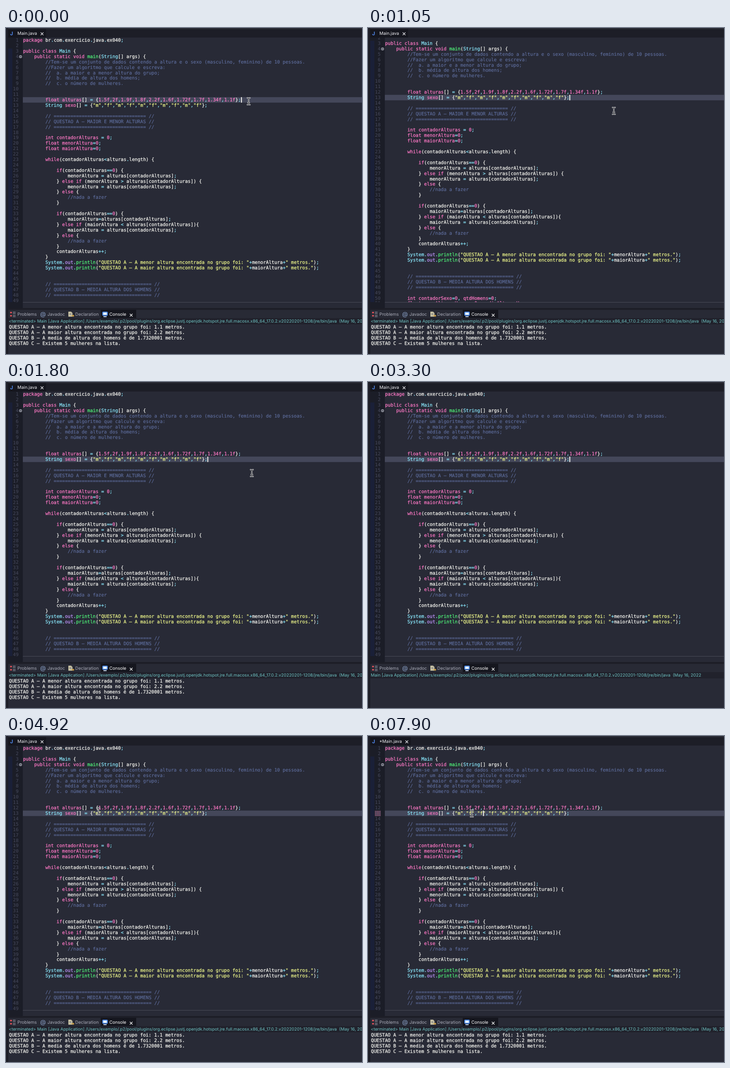
Recreate the animation shown at these times as an HTML page. Size 782 px wide and 716 px high, loop 8 s.

```html
<!DOCTYPE html>
<html lang="pt">
<head>
<meta charset="utf-8">
<title>Main.java</title>
<style>
html, body { margin: 0; width: 100%; height: 100%; overflow: hidden; background: #1d1e27; }
#stage { position: relative; width: 782px; height: 716px; overflow: hidden; background: #1d1e27;
  font: 9.6px/18px Inter, "Open Sans", sans-serif; color: #a9abb8; text-rendering: geometricPrecision; white-space: pre; }
#stage div, #stage svg { position: absolute; }
#stage i { font-style: normal; line-height: 0; }

#topEdge { left: 5px; top: 1px; width: 777px; height: 1px; background: #3b3d49; }
.tab { background: #15161e; color: #f0f0f4; }
#fileTab { left: 5px; top: 2px; height: 19px; line-height: 22px; padding: 0 4px 0 20px; }
#fileTab b { font-weight: 400; margin-left: 6px; font-size: 15px; line-height: 0; vertical-align: -1.5px; }
#stage .j { position: absolute; left: 4px; top: 0; color: #4f86e8; font-weight: 700; font-size: 11px; line-height: 21px; }

.mono { font: 10.2px/11.9px "DejaVu Sans Mono", "Noto Sans Mono", monospace; -webkit-text-stroke: .25px currentColor; }
#editor { left: 0; top: 21px; width: 782px; height: 581px; overflow: hidden; background: #282a36; }
#ruler { left: 0; top: 0; width: 37px; height: 593px; background: linear-gradient(90deg, #1d1e27 5px, #1b1d27 5px); }
#range { left: 5px; top: 23.8px; width: 9px; height: 900px; background: #1a2038; }
#hbar { left: 0; top: 602px; width: 782px; height: 13px; background: linear-gradient(90deg, #1d1e27 5px, #1b1d27 5px 37px, #282a36 37px); }
#hbar::after { content: ""; position: absolute; left: 37px; right: 0; height: 1px; background: #484a57; }
#doc { left: 0; top: .1px; width: 782px; height: 100%; }
#code { left: 37.4px; top: 1px; color: #f8f8f2; }
#nums { left: 0; top: 1px; width: 27.6px; text-align: right; color: #474a5e; -webkit-text-stroke: 0; }
#current { left: 37px; top: 0; width: 745px; height: 11.9px; background: #44475a; }
#mark { left: 15px; top: 142.8px; width: 13px; height: 11.9px; background: #65465f; }
#caret { left: 0; top: 0; width: 1.5px; height: 11.9px; background: #f8f8f2; }

.key { color: #ff79c6; } .type { color: #8be9fd; } .op { color: #8be9fd; } .call { color: #50fa7b; }
.field { color: #bd93f9; } .str { color: #f1fa8c; } .note { color: #6272a4; -webkit-text-stroke: .1px; }

#views { left: 5px; top: 619px; width: 777px; height: 18px; background: #282a35; line-height: 21px; }
#views div { top: 0; height: 18px; }
#info { left: 5px; top: 637px; width: 777px; height: 14px; padding-left: 1px; font-size: 9.35px; line-height: 15px; color: #6fc4c4; background: #21222c; }
#console { left: 5px; top: 651px; width: 777px; height: 65px; background: #282a36; }
#output { left: 1.5px; top: 1px; color: #f8f8f2; }
#mouse { left: -6px; top: -10px; width: 12px; height: 20px; }

.play { animation: 8s step-end infinite; }
#doc { animation-name: scroll; } #current { animation-name: row; } #caret { animation-name: caret; }
#mouse { animation-name: mouse; } #output { animation-name: print; } #mark { animation-name: mark; }
.ended { animation-name: ended; } .star { animation-name: star; }
.before { animation-name: before; } .after { animation-name: after; }

@keyframes scroll {
  0% { transform: none; } 13.125% { transform: translateY(-17px); } 15% { transform: translateY(-150px); }
  16.875% { transform: translateY(-305.7px); } 18.75% { transform: translateY(-270px); }
  20.625% { transform: translateY(-80px); } 22.5%, 100% { transform: none; }
}
@keyframes row {
  0% { transform: translateY(130.9px); } 3.75%, 100% { transform: translateY(142.8px); }
}
@keyframes caret {
  0% { transform: translate(516.2px, 130.9px); opacity: 1; }
  3.75% { transform: translate(442.3px, 142.8px); opacity: 1; }
  33.75% { transform: translate(442.3px, 142.8px); opacity: 0; }
  41.25% { transform: translate(442.3px, 142.8px); opacity: 1; }
  44.875% { transform: translate(442.3px, 142.8px); opacity: 0; }
  52.375% { transform: translate(442.3px, 142.8px); opacity: 1; }
  59.625% { transform: translate(442.3px, 142.8px); opacity: 0; }
  67.125% { transform: translate(442.3px, 142.8px); opacity: 1; }
  74.5% { transform: translate(442.3px, 142.8px); opacity: 0; }
  87.625% { transform: translate(252.6px, 142.8px); opacity: 1; }
  93.25% { transform: translate(246.5px, 142.8px); opacity: 1; }
  95.125%, 100% { transform: translate(252.6px, 142.8px); opacity: 1; }
}
@keyframes mouse {
  0% { transform: translate(533px, 161px); } 3.75% { transform: translate(535px, 166px); }
  5.625% { transform: translate(538px, 169px); } 7.5% { transform: translate(539px, 171px); }
  11.25% { transform: translate(540px, 177px); } 13.125% { transform: translate(540px, 182px); }
  15% { transform: translate(544px, 192px); } 16.875% { transform: translate(546px, 199px); }
  20.625% { transform: translate(543px, 199px); } 22.5% { transform: translate(540px, 200px); }
  24.375% { transform: translate(383px, 145px); } 26.25% { transform: translate(383px, -30px); }
  48.625% { transform: translate(250px, 146px); } 50.5% { transform: translate(130px, 175px); }
  52.375% { transform: translate(75px, 186px); } 54.25% { transform: translate(82px, 190px); }
  56% { transform: translate(112px, 174px); } 57.875% { transform: translate(152px, 167px); }
  59.625% { transform: translate(186px, 165px); } 61.5% { transform: translate(203px, 165px); }
  63.375% { transform: translate(207px, 166px); } 65.25% { transform: translate(212px, 165px); }
  67.125% { transform: translate(220px, 164px); } 69% { transform: translate(228px, 165px); }
  70.875% { transform: translate(236px, 166px); } 72.625% { transform: translate(244px, 167px); }
  74.5% { transform: translate(249px, 168px); } 76.375% { transform: translate(252px, 169px); }
  78.25% { transform: translate(253px, 178px); } 80.125% { transform: translate(256px, 184px); }
  82% { transform: translate(257px, 186px); } 87.625% { transform: translate(255px, 171px); }
  89.5% { transform: translate(285px, 212px); } 91.375% { transform: translate(312px, 240px); }
  93.25% { transform: translate(312px, -30px); } 97% { transform: translate(246px, 186px); }
  98.75%, 100% { transform: translate(228px, 170px); }
}
@keyframes print { 0% { opacity: 1; } 41.25% { opacity: 0; } 43.125%, 100% { opacity: 1; } }
@keyframes ended { 0% { font-size: 9.35px; } 41.25% { font-size: 0; } 44.875%, 100% { font-size: 9.35px; } }
@keyframes mark { 0% { opacity: 0; } 93.25%, 100% { opacity: 1; } }
@keyframes star { 0% { font-size: 0; } 93.25%, 100% { font-size: 9.6px; } }
@keyframes before { 0% { font-size: 10.2px; } 93.25%, 100% { font-size: 0; } }
@keyframes after { 0% { font-size: 0; } 95.125%, 100% { font-size: 10.2px; } }
</style>
</head>
<body>
<div id="stage">
  <div id="topEdge"></div>
  <div id="fileTab" class="tab"><i class="j">J</i><i class="star play">*</i>Main.java<b>×</b></div>

  <div id="editor">
    <div id="ruler"></div>
    <div id="doc" class="mono play">
      <div id="range"></div>
      <div id="current" class="play"></div>
      <div id="mark" class="play"></div>
      <div id="nums"></div>
      <svg style="left:28px;top:38px" width="8" height="8"><circle cx="4" cy="4" r="3.3" fill="#8e909b"/><path d="M2 4h4" stroke="#1b1d27"/></svg>
      <div id="code"></div>
      <div id="caret" class="play"></div>
    </div>
  </div>
  <div id="hbar"></div>

  <div id="views">
    <div style="left:20px">Problems</div>
    <div style="left:86px">Javadoc</div>
    <div style="left:147px">Declaration</div>
    <div class="tab" style="left:203px;width:78px"></div>
    <div style="left:222px;color:#fff">Console</div>
    <div style="left:265px;color:#fff;font-size:15px">×</div>
    <div style="left:70px;color:#8fa6cf;font-size:13px">@</div>
    <svg style="left:0;top:0" width="240" height="18" fill="none">
      <path d="M4 6h4M4 13h4" stroke="#e0545c" stroke-width="3"/>
      <path d="M10 5h6M10 8h6M10 12h6M10 15h6" stroke="#a9abb8"/>
      <path d="M132 4h6l3 3v8h-9z" fill="#c9c3a4"/>
      <path d="M134 8h5M134 10.5h5" stroke="#6b6d7a"/>
      <path d="M138 13h6m-2-2l2 2-2 2" stroke="#d5a545" stroke-width="1.5"/>
      <rect x="207.5" y="5" width="10" height="7" rx="1" fill="#eaf2ff" stroke="#4b8bf0" stroke-width="2"/>
      <path d="M209 15h7" stroke="#c4d4ee" stroke-width="2"/>
    </svg>
  </div>
  <div id="info"><i class="ended play">&lt;terminated&gt; </i>Main [Java Application] /Users/exemplo/.p2/pool/plugins/org.eclipse.justj.openjdk.hotspot.jre.full.macosx.x86_64_17.0.2.v20220201-1208/jre/bin/java  (May 16, 2022</div>
  <div id="console"><div id="output" class="mono play">QUESTAO A – A menor altura encontrada no grupo foi: 1.1 metros.
QUESTAO A – A maior altura encontrada no grupo foi: 2.2 metros.
QUESTAO B – A media de altura dos homens é de 1.7320001 metros.
QUESTAO C – Existem 5 mulheres na lista.</div></div>

  <svg id="mouse" class="play" viewBox="-6 -10 12 20" fill="none" stroke-linecap="round">
    <defs><path id="beam" d="M-3 -7.5Q0 -7.5 0 -5.5Q0 -7.5 3 -7.5M0 -5.5V5.5M-3 7.5Q0 7.5 0 5.5Q0 7.5 3 7.5M-1.5 3H1.5"/></defs>
    <use href="#beam" stroke="#f4f4f4" stroke-width="2.6"/>
    <use href="#beam" stroke="#17181d"/>
  </svg>
</div>

<script>
const heading = text => {
  const rule = `        // ${"=".repeat(text.length)} //`;
  return `${rule}\n        // ${text} //\n${rule}`;
};

const source = `package br.com.exercicio.java.ex040;

public class Main {
    public static void main(String[] args) {
        //Tem-se um conjunto de dados contendo a altura e o sexo (masculino, feminino) de 10 pessoas.
        //Fazer um algoritmo que calcule e escreva:
        //  a. a maior e a menor altura do grupo;
        //  b. média de altura dos homens;
        //  c. o número de mulheres.


        float alturas[] = {1.5f,2f,1.9f,1.8f,2.2f,1.6f,1.72f,1.7f,1.34f,1.1f};
        String sexo[] = {"m","f","m","f","m","f","m","f","m","f"};

${heading("QUESTAO A – MAIOR E MENOR ALTURAS")}

        int contadorAlturas = 0;
        float menorAltura=0;
        float maiorAltura=0;

        while(contadorAlturas<alturas.length) {

            if(contadorAlturas==0) {
                menorAltura = alturas[contadorAlturas];
            } else if (menorAltura > alturas[contadorAlturas]) {
                menorAltura = alturas[contadorAlturas];
            } else {
                //nada a fazer
            }

            if(contadorAlturas==0) {
                maiorAltura=alturas[contadorAlturas];
            } else if (maiorAltura < alturas[contadorAlturas]){
                maiorAltura = alturas[contadorAlturas];
            } else {
                //nada a fazer
            }
            contadorAlturas++;
        }
        System.out.println("QUESTAO A – A menor altura encontrada no grupo foi: "+menorAltura+" metros.");
        System.out.println("QUESTAO A – A maior altura encontrada no grupo foi: "+maiorAltura+" metros.");


${heading("QUESTAO B – MEDIA ALTURA DOS HOMENS")}

        int contadorSexo=0, qtdHomens=0;
        float somaAlturasHomens=0, mediaAlturasHomens;

        while(contadorSexo < sexo.length) {
            if(sexo[contadorSexo].equals("m")) {
                somaAlturasHomens = somaAlturasHomens+ alturas[contadorSexo];
                qtdHomens = qtdHomens+1;
            } else {
                // sexo feminino
            }
            contadorSexo++;
        }
        mediaAlturasHomens = somaAlturasHomens / qtdHomens;
        System.out.println("QUESTAO B – A media de altura dos homens é de "+mediaAlturasHomens+" metros.");


${heading("QUESTAO C – NUMERO DE MULHERES")}

        int contadorMulheres=0, qtdMulheres=0;

        while(contadorMulheres < sexo.length) {
            if(sexo[contadorMulheres].equals("f")) {
                qtdMulheres+=1;
            } else {`;

const token = /(?<note>\/\/.*)|(?<str>"[^"]*")|(?<key>\b(?:package|public|class|static|void|float|int|while|if|else|\d[\d.]*f?)\b)|(?<type>\b(?:System|String|Main)\b)|(?<call>\b(?:main|println|equals)\b)|(?<field>\bout\b)|(?<op>[.,;=<>+\/]+)|(?<name>\w+)/g;
const escape = text => text.replace(/&/g, "&amp;").replace(/</g, "&lt;").replace(/>/g, "&gt;");

function paint(line) {
  const declares = /^\s*(int|float|String) /.test(line);
  return line.replace(token, (text, ...rest) => {
    const groups = rest[rest.length - 1];
    let kind = Object.keys(groups).find(name => groups[name] !== undefined);
    if (kind === "name" && declares) kind = "key";
    return `<span class="${kind}">${escape(text)}</span>`;
  });
}

const lines = source.split("\n");
const code = document.getElementById("code");
code.innerHTML = lines.map(paint).join("\n");
document.getElementById("nums").textContent = lines.map((_, i) => i + 1).join("\n");

// The third value of the list is the one that gets edited.
code.querySelectorAll(".str")[2].innerHTML = '"<i class="before play">m</i><i class="after play">f</i>"';
</script>
</body>
</html>
```
